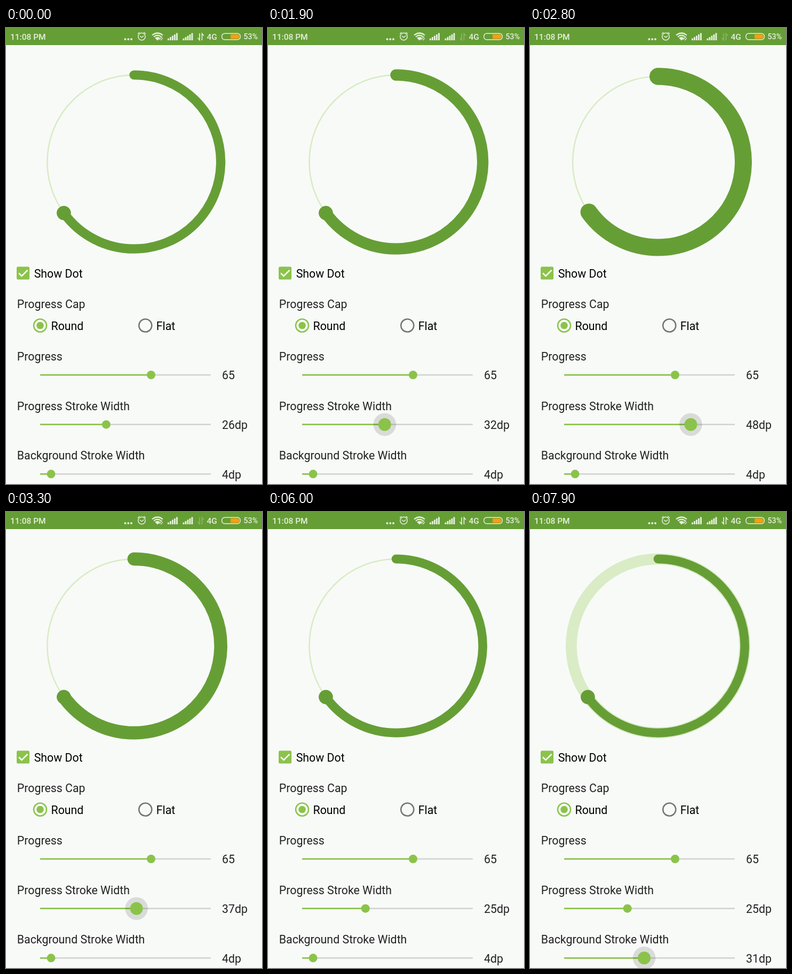
An HTML page that plays this animation: 480 px wide and 853 px high, repeating every 8000 ms.

```html
<!DOCTYPE html>
<html lang="en">
<head>
<meta charset="utf-8">
<title>Circular progress settings</title>
<style>
  html, body { margin: 0; height: 100%; overflow: hidden; background: #f8faf8; }
  svg { display: block; width: 100%; height: 100%; }
  text { font-family: Roboto, sans-serif; font-size: 21.33px; fill: #212121; }
  .option { fill: #000; }
  .status text { font-weight: 500; fill: #e6efdd; }
  .line { fill: none; stroke: #e6efdd; stroke-width: 1.5; }
  .solid { fill: #e6efdd; }
</style>
</head>
<body>
<svg id="stage" viewBox="0 0 480 853">
  <g class="status">
    <rect width="480" height="32" fill="#669e36"/>
    <text x="8" y="22" style="font-size:15.5px">11:08 PM</text>
    <g class="solid">
      <circle cx="223.5" cy="21" r="2"/><circle cx="229.3" cy="21" r="2"/><circle cx="235" cy="21" r="2"/>
    </g>
    <g class="line">
      <circle cx="254.5" cy="16" r="6.7"/>
      <path d="M251 15l3.5 2.5 4-3M247 11l3.5-3M262 11l-3.5-3"/>
      <path d="M274 13.5Q284 5.5 294 13.5M277 16.5Q284 11 291 16.5" stroke-width="2.2"/>
      <path d="M287 22l6-6M290 23l4-4" stroke-width="1.2"/>
    </g>
    <path class="solid" d="M279 18.5Q284 15 289 18.5L284 23.5Z"/>
    <g id="bars" class="solid"></g>
    <g id="traffic" class="line">
      <path d="M363 10V22.5L359.5 18.5M367.5 23V10.5L371 14.5" stroke-width="1.7"/>
    </g>
    <text x="376.5" y="22" style="font-size:15.5px">4G</text>
    <rect class="line" x="404.8" y="10.2" width="34.5" height="11.6" rx="5"/>
    <path d="M421 12H434Q437.5 12 437.5 16T434 20H421Z" fill="#ff9d14"/>
    <text x="445.5" y="21.3" style="font-size:14.2px">53%</text>
  </g>

  <g transform="rotate(-90 240 250.5)" fill="none">
    <circle id="ring" cx="240" cy="250.5" stroke="#d9ecc5"/>
    <circle id="arc" cx="240" cy="250.5" stroke="#669e36" stroke-linecap="round"
            pathLength="100" stroke-dasharray="65 100"/>
  </g>
  <circle id="dot" r="13.33" fill="#669e36"/>

  <rect x="20" y="446.5" width="24" height="24" rx="2.5" fill="#8bc34a"/>
  <path d="M24 458.5l5.5 5.5L40.5 453" fill="none" stroke="#f8faf8" stroke-width="2.6"/>
  <text class="option" x="52.7" y="466.7">Show Dot</text>

  <text x="20.8" y="524.3">Progress Cap</text>
  <g fill="none" stroke-width="2.6">
    <circle cx="64" cy="556.5" r="12" stroke="#8bc34a"/>
    <circle cx="261.3" cy="556.5" r="12" stroke="#757575"/>
  </g>
  <circle cx="64" cy="556.5" r="6.8" fill="#8bc34a"/>
  <text class="option" x="84.5" y="564.7">Round</text>
  <text class="option" x="281.7" y="564.7">Flat</text>
</svg>
<script>
const LOOP = 8000, STEP = 100;
const DP = 2 / 3, OUTER = 176, DOT = 40;
const PROGRESS = 65;
const byId = id => document.getElementById(id);

function add(parent, tag, attrs, content = '') {
  const node = document.createElementNS('http://www.w3.org/2000/svg', tag);
  set(node, attrs);
  node.textContent = content;
  return parent.appendChild(node);
}

function set(node, attrs) {
  for (const key in attrs) node.setAttribute(key, attrs[key]);
}

// Piecewise linear value through [time, value] keys
function track(keys, t) {
  const next = keys.findIndex(key => key[0] > t);
  if (next === 0) return keys[0][1];
  if (next < 0) return keys[keys.length - 1][1];
  const [t0, v0] = keys[next - 1], [t1, v1] = keys[next];
  return v0 + (v1 - v0) * (t - t0) / (t1 - t0);
}

function makeSlider(label, y) {
  const stage = byId('stage');
  add(stage, 'text', { x: 20.8, y: y - 27 }, label);
  add(stage, 'rect', { x: 64, y: y - 1.33, width: 320, height: 2.67, fill: '#d2d4d2' });
  const fill = add(stage, 'rect', { x: 64, y: y - 1.33, height: 2.67, fill: '#8bc34a' });
  const halo = add(stage, 'circle', { cy: y, fill: '#000', 'fill-opacity': 0.125 });
  const thumb = add(stage, 'circle', { cy: y, fill: '#8bc34a' });
  const value = add(stage, 'text', { x: 405, y: y + 8.4 });
  return (x, text, press, fade) => {
    set(fill, { width: x - 64 });
    set(halo, { cx: x, r: 21.3 * Math.min(1, press * 2), opacity: fade });
    set(thumb, { cx: x, r: 8 + 4 * press });
    value.textContent = text;
  };
}

const progressSlider = makeSlider('Progress', 649);
const strokeSlider = makeSlider('Progress Stroke Width', 741.7);
const backSlider = makeSlider('Background Stroke Width', 834.3);

for (const left of [303, 331.5])
  for (let i = 0; i < 5; i++) {
    const height = 3.5 + i * 2.5;
    add(byId('bars'), 'rect', { x: left + i * 4, y: 23 - height, width: 2.9, height });
  }

const strokeKeys = [[1700, 26], [1800, 28], [2300, 48], [2500, 52], [2600, 52],
  [3300, 37], [3500, 35], [4200, 29], [4400, 28], [5100, 25]];
const strokePress = [[1600, 0], [1800, 1], [5400, 1], [5700, 0]];
const strokeFade = [[5400, 1], [6000, 0]];
const backKeys = [[7400, 4], [7500, 5], [7900, 31]];
const backPress = [[7300, 0], [7500, 1]];

function draw(t) {
  const stroke = Math.round(track(strokeKeys, t));
  const back = Math.round(track(backKeys, t));
  const radius = OUTER - Math.max(stroke, back, DOT) * DP / 2;
  const angle = PROGRESS / 100 * 2 * Math.PI;

  set(byId('ring'), { r: radius, 'stroke-width': back * DP });
  set(byId('arc'), { r: radius, 'stroke-width': stroke * DP });
  set(byId('dot'), {
    cx: 240 + radius * Math.sin(angle),
    cy: 250.5 - radius * Math.cos(angle)
  });

  progressSlider(272, PROGRESS, 0, 0);
  strokeSlider(64 + (stroke - 2) * 320 / 62, stroke + 'dp', track(strokePress, t), track(strokeFade, t));
  backSlider(84.5 + (back - 4) * 4.8, back + 'dp', track(backPress, t), 1);

  const idle = (t >= 700 && t < 3900) || (t >= 4800 && t < 5700);
  set(byId('traffic'), { opacity: idle ? 0.3 : 1 });
}

function tick(now) {
  draw(Math.floor(now % LOOP / STEP) * STEP);
  requestAnimationFrame(tick);
}
draw(0);
requestAnimationFrame(tick);
</script>
</body>
</html>
```
